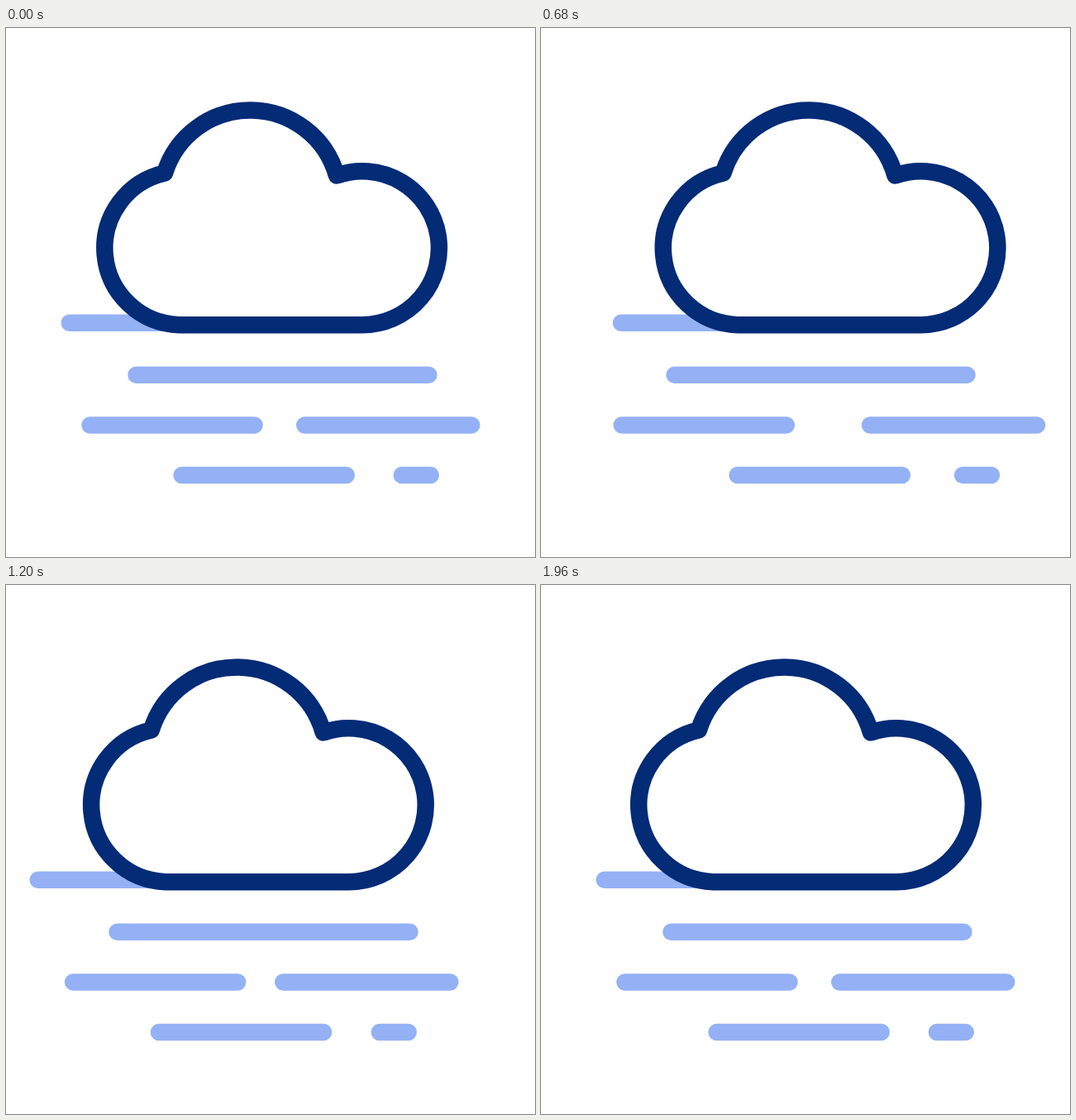
Recreate the animation shown at these times as an HTML page. Size 640 by 640 pixels, loop 2000 ms.

```html
<!DOCTYPE html>
<html lang="en">
<head>
<meta charset="utf-8">
<title>Drifting cloud</title>
<style>
html, body { margin: 0; width: 100%; height: 100%; overflow: hidden; background: #fff; }
svg { display: block; width: 100%; height: 100%; }
</style>
</head>
<body>
<svg viewBox="0 0 640 640">
  <g id="bars" fill="#93b1f4"></g>
  <g id="cloud">
    <path id="body" fill="#fff" d="M209.5 359.2A93 93 0 0 1 192 175.5A108.5 108.5 0 0 1 400 178.5A93 93 0 1 1 430.5 359.2Z"/>
    <path fill="#d2dcfd" d="M209.5 359.2A93 93 0 0 1 192 175.5A108.5 108.5 0 0 1 304 100V108A112 112 0 0 0 269.5 208A92 92 0 0 0 281 350V359.2Z"/>
    <use href="#body" style="fill:none" id="edge"/>
    <path fill="none" stroke="#032b76" stroke-width="20.5" stroke-linejoin="round" d="M209.5 359.2A93 93 0 0 1 192 175.5A108.5 108.5 0 0 1 400 178.5A93 93 0 1 1 430.5 359.2Z"/>
  </g>
</svg>
<script>
const LOOP = 2000, THICK = 20.5;

// Each drift: time of the right peak, its offset, time of the left peak, its offset, time of rest
const bars = [
  { x: 66.5, end: 290, y: 356.8, drift: [490, 37.5, 1190, -38.3, 1850] },
  { x: 147.2, end: 521.6, y: 419.8, drift: [420, 36.5, 985, -35, 1560] },
  { x: 91.2, end: 310.8, y: 480.5, drift: [385, 36.5, 955, -40.3, 1450] },
  { x: 351, end: 573.5, y: 480.5, drift: [680, 36.8, 1320, -36, 1820] },
  { x: 202.3, end: 422, y: 541, drift: [560, 41, 1040, -36.5, 1600] },
  { x: 468.6, end: 524, y: 541, drift: [600, 36.5, 1325, -36, 1827] }
];

const parts = bars.map(({ x, end, y, drift }) => {
  const el = document.createElementNS("http://www.w3.org/2000/svg", "rect");
  const box = { x, y: y - THICK / 2, width: end - x, height: THICK, rx: THICK / 2 };
  for (const name in box) el.setAttribute(name, box[name]);
  document.getElementById("bars").append(el);
  return { el, drift };
});
parts.push({ el: document.getElementById("cloud"), drift: [685, 28.5, 1390, -29, 2000] });

// Soft ease, halfway between linear and smoothstep
const ease = p => (p + p * p * (3 - 2 * p)) / 2;
const tween = (t, t0, t1, a, b) => a + (b - a) * ease((t - t0) / (t1 - t0));

function offset(t, [t1, right, t2, left, t3]) {
  if (t < t1) return tween(t, 0, t1, 0, right);
  if (t < t2) return tween(t, t1, t2, right, left);
  return t < t3 ? tween(t, t2, t3, left, 0) : 0;
}

function draw() {
  const t = performance.now() % LOOP;
  for (const { el, drift } of parts) {
    el.setAttribute("transform", `translate(${offset(t, drift).toFixed(2)} 0)`);
  }
  requestAnimationFrame(draw);
}
draw();
</script>
</body>
</html>
```
